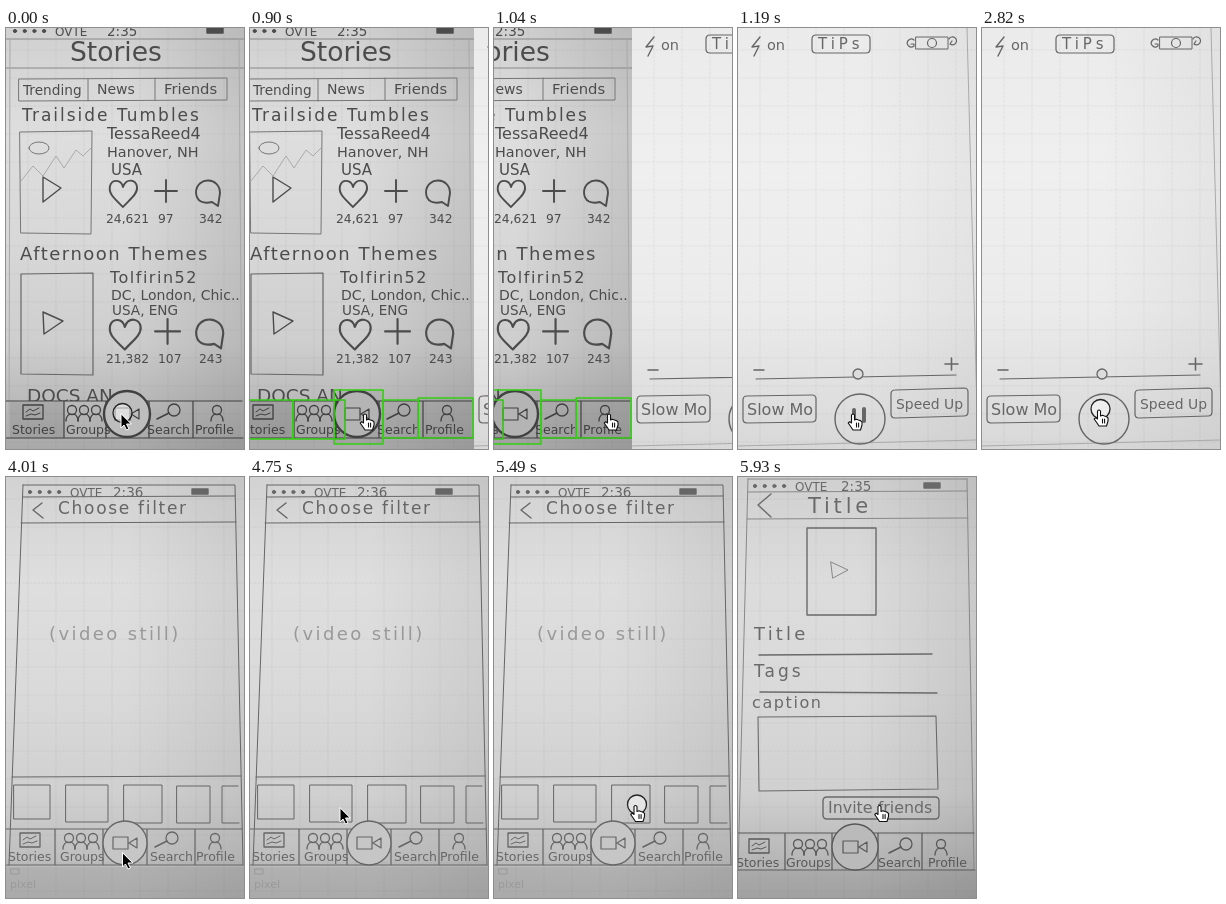
Write an HTML page with a canvas that moves like this. It is 238 by 421 pixels and loops after 8 s.

```html
<!DOCTYPE html>
<html lang="en">
<head>
<meta charset="utf-8">
<title>Paper prototype</title>
<style>
  html, body { margin: 0; width: 100%; height: 100%; overflow: hidden; background: #ccc; }
  canvas { display: block; width: 238px; height: 421px; }
</style>
</head>
<body>
<canvas id="stage"></canvas>
<script>
const W = 238, H = 421, LOOP = 8000;
const stage = document.getElementById('stage');
const dpr = window.devicePixelRatio || 1;
stage.width = W * dpr;
stage.height = H * dpr;
const ctx = stage.getContext('2d');
let ink = '#555'; // pencil tone of the current screen

// ---- drawing helpers ----
function draw(d, width = 1, color = ink, fill) {
  const path = new Path2D(d);
  if (fill) { ctx.fillStyle = fill; ctx.fill(path); }
  ctx.lineWidth = width;
  ctx.strokeStyle = color;
  ctx.stroke(path);
}

function drawAt(x, y, d, ...style) {
  ctx.save();
  ctx.translate(x, y);
  draw(d, ...style);
  ctx.restore();
}

function circle(x, y, r, width, color, fill) {
  drawAt(x, y, `M${r},0 A${r},${r} 0 1 1 ${-r},0 A${r},${r} 0 1 1 ${r},0Z`, width, color, fill);
}

function box(x1, y1, x2, y2, width, color, fill) {
  draw(`M${x1},${y1} H${x2} V${y2} H${x1}Z`, width, color, fill);
}

function roundBox(x, y, w, h, tilt = 0, width = 1.2) {
  draw(`M${x + 4},${y} L${x + w - 4},${y + tilt} q4,0 4,4 v${h - 8} q0,4 -4,4
        L${x + 4},${y + h} q-4,0 -4,-4 v${8 - h} q0,-4 4,-4Z`, width);
}

function text(str, x, y, size, spacing = 0, color = ink) {
  ctx.font = `${size}px "DejaVu Sans", sans-serif`;
  ctx.letterSpacing = spacing + 'px';
  ctx.fillStyle = color;
  ctx.fillText(str, x, y);
}

function gradient(x, y, tones) {
  const g = ctx.createLinearGradient(0, 0, x, y);
  tones.forEach((c, i) => g.addColorStop(i / (tones.length - 1), c));
  ctx.fillStyle = g;
  ctx.fillRect(0, 0, W, H);
}

// tones run top to bottom; shade darkens the right side
function paper(shade, ...tones) {
  gradient(0, H, tones);
  gradient(W, 0, ['rgba(40,40,40,0)', 'rgba(40,40,40,0)', `rgba(40,40,40,${shade})`]);
  let grid = '';
  for (let p = 22; p < H; p += 28) grid += `M0,${p} H${W} M${p},0 V${H}`;
  ctx.setLineDash([2, 2]);
  draw(grid, 1, 'rgba(90,90,90,.09)');
  ctx.setLineDash([]);
}

function statusBar(x, y, time, timeX, batteryX) {
  for (let i = 0; i < 4; i++) circle(x + i * 9.7, y, 1.6, 1, ink, ink);
  text('OVTE', x + 40, y + 5, 12);
  text(time, timeX, y + 5, 13.5);
  box(batteryX, y - 3, batteryX + 16, y + 2, 1.4, ink, ink);
}

const person = (x, y) => {
  circle(x, y, 4.5, 1.3);
  drawAt(x, y, 'M-2,4 Q-6,6 -6,11 M2,4 Q6,6 6,11', 1.3);
};

function camera(x, y) {
  draw(`M${x - 12},${y - 6} h15 v12 h-15Z M${x + 4},${y} l8,-5 v10Z`, 1.2);
}

// spots: icon centres; labels: left edges of the four captions
function tabBar({ top, bottom, dividers, spots, labels, iconY, base, cam, camFill, camLine = 1.3 }) {
  draw(`M0,${top} H236 M0,${bottom} H237` + dividers.map(x => `M${x},${top} V${bottom}`).join(''), 1.2);
  const [a, b, c, d] = spots;
  box(a - 10, iconY - 5, a + 10, iconY + 9, 1.3);
  drawAt(a, iconY, 'M-7,2 l4,-3 3,2 6,-3 M-7,6 l5,-2 4,1 5,-2', 1);
  for (const i of [-1, 0, 1]) person(b + i * 12, iconY);
  circle(c, iconY, 6, 1.3);
  draw(`M${c - 5},${iconY + 3} L${c - 17},${iconY + 9}`, 1.6);
  person(d, iconY);
  ['Stories', 'Groups', 'Search', 'Profile'].forEach((s, i) => text(s, labels[i], base, 12.5));
  circle(...cam, camLine, ink, camFill);
  camera(cam[0], cam[1]);
}

function counters(y, scale, likes, adds, notes) {
  const icon = (x, d) => {
    ctx.save();
    ctx.translate(x, y);
    ctx.scale(scale, scale);
    draw(d, 1.9);
    ctx.restore();
  };
  icon(103, 'M14,27 C6,19 -1,14 1,6 C3,-1 12,-1 14,7 C17,-2 27,-1 28,7 C29,14 20,20 14,27Z');
  icon(148, 'M1,11 H23 M12,0 V22');
  icon(189, 'M23,26 L25,13 C25,-3 2,-4 1,12 C1,22 9,24 17,22Z');
  const base = y + 39 + 4 * scale;
  text(likes, 100, base, 12.3);
  text(adds, 152, base, 12.3);
  text(notes, 193, base, 12.3);
}

// ---- screens ----
function stories() {
  ink = '#4c4c4c';
  paper(.13, '#d0d0d0', '#dedede', '#d8d8d8', '#cecece', '#a9a9a9');
  statusBar(9, 3, '2:35', 101, 201);
  draw('M0,11 H238 M0,40 H238', 1, '#888');
  draw('M4,11 L3,410 M233,11 L236,410', 1, '#aaa');
  text('Stories', 64, 33, 26.5);
  draw('M13,51 L221,50 V72 L13,73Z M82,51 V73 M149,50 V72', 1, '#777');
  text('Trending', 17, 67, 13.7);
  text('News', 91, 66, 14);
  text('Friends', 158, 66, 14.8);

  text('Trailside Tumbles', 16, 93, 17, 2);
  draw('M14,104 L86,103 L85,206 L15,205Z', 1, '#777');
  draw('M23,120 a10,6 0 1 1 20,0 a10,6 0 1 1 -20,0Z', 1, '#777');
  draw('M15,153 L27,138 37,148 50,128 58,140 70,122 77,128 85,120', 1, '#aaa');
  draw('M37,149 L55,160 37,174Z', 1.4);
  text('TessaReed4', 101, 111, 16);
  text('Hanover, NH', 101, 129, 14.4);
  text('USA', 105, 147, 15);
  counters(152, 1, '24,621', '97', '342');

  text('Afternoon Themes', 14, 232, 18, 1.5);
  draw('M15,246 L87,245 L87,347 L15,346Z', 1.2, '#666');
  draw('M37,284 L57,293 38,306Z', 1.4);
  text('Tolfirin52', 104, 255, 16, 1.5);
  text('DC, London, Chic..', 105, 272, 14);
  text('USA, ENG', 106, 287, 13.6);
  counters(291, 1.13, '21,382', '107', '243');

  ctx.save();
  ctx.beginPath();
  ctx.rect(0, 350, W, 23);
  ctx.clip();
  text('DOCS AN', 21, 374, 18.5);
  ctx.restore();
  ctx.fillStyle = 'rgba(70,70,70,.14)';
  ctx.fillRect(4, 374, 54, 36);
  ink = '#404040';
  tabBar({ top: 373, bottom: 410, dividers: [58, 100, 143, 187], spots: [27, 78, 168, 211],
           labels: [6, 60, 141, 189], iconY: 382, base: 406,
           cam: [121, 386, 23], camFill: '#bdbdbd', camLine: 2.4 });
}

function hotspots() {
  const spots = [[2, 372, 57, 411], [57, 372, 109, 411], [98, 362, 147, 416],
                 [147, 372, 182, 410], [182, 370, 237, 410]];
  for (const s of spots) box(...s, 1.6, '#35cf14', 'rgba(60,60,60,.07)');
}

function recorder(recording) {
  ink = '#666';
  paper(.05, '#ebebeb', '#efefef', '#ebebeb', '#d8d8d8');
  draw('M229,0 L239,385 M0,418 L238,412', 1, '#aaa');
  draw('M22,9 L14,19 21,18 16,28', 1.4);
  text('on', 29, 22, 14.5);
  roundBox(74, 7, 58, 18);
  text('TiPs', 80, 21, 15, 4);
  box(178, 9, 210, 21);
  circle(194, 15, 4.5, 1.2);
  draw('M176,12 a4,4 0 1 0 0,6 v-2 h-3 M211,11 a4,4 0 1 1 1,5 l2,-3', 1.2);
  draw('M16,342 H26 M207,336 H220 M213.5,330 V342', 1.6);
  draw('M18,351 L218,347', 1.2);
  circle(120, 346, 5, 1.3, ink, '#dcdcdc');
  roundBox(5, 368, 73, 27, -1);
  text('Slow Mo', 9, 387, 16);
  roundBox(153, 362, 77, 28, -2);
  text('Speed Up', 158, 381, 13.9);
  circle(122, 391, 25, 1.4);
  if (recording) draw('M116,382 V393 M126,381 V393', 4);
}

function filters() {
  ink = '#666';
  paper(.08, '#d2d2d2', '#dedede', '#dadada', '#d0d0d0', '#b4b4b4');
  ctx.fillStyle = 'rgba(80,80,80,.1)';
  ctx.fillRect(0, 390, W, 31);
  draw('M17,8 H229 L237,388 M17,8 L3,388 M17,20 L229,19 M15,46 L230,45 M6,300 L235,299');
  statusBar(24, 15, '2:36', 107, 186);
  draw('M36,26 L27,33 37,41', 1.4);
  text('Choose filter', 52, 37, 17, 1.7);
  text('(video still)', 43, 163, 18, 2.4, '#999');
  box(8, 308, 44, 342);
  box(60, 308, 102, 345);
  box(118, 308, 156, 346);
  box(171, 309, 204, 346);
  draw('M232,309 H216 V346 H233');
  tabBar({ top: 352, bottom: 388, dividers: [49, 97, 141, 189], spots: [24, 75, 166, 209],
           labels: [2, 54, 144, 190], iconY: 361, base: 384, cam: [119, 366, 22], camFill: '#c6c6c6' });
  text('pixel', 4, 411, 11, 0, '#999');
  box(5, 392, 13, 397, 1, '#999');
}

function details() {
  ink = '#6a6a6a';
  paper(.1, '#d0d0d0', '#dcdcdc', '#dadada', '#d0d0d0', '#a8a8a8');
  ctx.fillStyle = 'rgba(80,80,80,.08)';
  ctx.fillRect(0, 394, W, 27);
  draw('M10,2 H229 M10,15 L229,14 M9,42 L230,41 M10,2 L0,393 M229,2 L236,393', 1, '#888');
  statusBar(17, 9, '2:35', 103, 186);
  draw('M33,17 L20,28 33,40', 1.4);
  text('Title', 70, 36, 21, 3.8);
  box(69, 51, 138, 138, 1.4);
  draw('M93,85 L110,93 95,101Z', 1, '#888');
  text('Title', 16, 163, 18, 3.2);
  text('Tags', 16, 200, 17, 3);
  text('caption', 14, 231, 16, 1.6);
  draw('M21,178 L194,177 M22,215 L199,216', 1.4);
  draw('M20,240 L198,239 L200,312 L21,314Z', 1.1);
  roundBox(85, 320, 116, 22, 0, 1.4);
  text('Invite friends', 90, 336, 15.9);
  ink = '#585858';
  tabBar({ top: 356, bottom: 393, dividers: [47, 94, 140, 184], spots: [21, 72, 168, 203],
           labels: [-2, 48, 140, 190], iconY: 367, base: 390, cam: [117, 370, 23], camFill: '#bababa' });
}

// ---- timeline ----
// [time, distance scrolled]
const slide = [[0, 0], [900, 14], [1040, 100], [1190, W], [2960, W + 100], [3110, 2 * W],
               [5640, 2 * W + 14], [5780, 2 * W + 100], [5930, 3 * W]];

// [time, x, y, shape, pressed]
const pointer = [
  [0, 115, 386, 'arrow', true], [150, 115, 386, 'arrow'], [900, 115, 386, 'hand'],
  [1780, 115, 385, 'hand'], [1930, 115, 383, 'hand'], [2380, 117, 382, 'hand'],
  [2820, 117, 382, 'hand', true], [2960, 117, 382, 'hand'], [3110, 117, 382, 'arrow'],
  [4010, 116.5, 376, 'arrow'], [4160, 105, 366, 'arrow'], [4310, 85, 355, 'arrow'],
  [4460, 68, 343, 'arrow'], [4600, 73, 336, 'arrow'], [4750, 90, 331, 'arrow'],
  [4900, 112, 329, 'arrow'], [5050, 131, 328, 'arrow'], [5200, 141.5, 328.5, 'hand'],
  [5490, 141.5, 328.5, 'hand', true], [5640, 141.5, 328.5, 'hand']
];

const at = (steps, t) => steps.filter(s => s[0] <= t).pop();

function drawPointer([, x, y, shape, pressed]) {
  if (pressed) circle(x + 1.5, y - 1, 9.5, 1.3, '#222', 'rgba(255,255,255,.5)');
  if (shape === 'arrow')
    drawAt(x, y, 'M0,0 V14 L3,11 5.5,16 8,15 5.5,10 10,10Z', 1, '#fff', '#000');
  else
    drawAt(x, y, `M-1.5,9 V1 Q0,-1 1.5,1 V6 L3.5,5.2 5.5,6 7.5,6.6 9,8 V11 L7.5,16 H0
                  L-2,13 -4.8,9 -3.3,7.6Z M3.5,9 V13 M5.6,9 V13`, 1.1, '#111', '#fff');
}

function frame(now) {
  const t = now % LOOP;
  const screens = [stories, () => recorder(t < 2380), filters, details];
  const scroll = at(slide, t)[1];
  ctx.setTransform(dpr, 0, 0, dpr, 0, 0);
  ctx.lineJoin = ctx.lineCap = 'round';
  screens.forEach((screen, i) => {
    const x = i * W - scroll;
    if (Math.abs(x) >= W) return;
    ctx.save();
    ctx.translate(x, 0);
    ctx.beginPath();
    ctx.rect(0, 0, W, H);
    ctx.clip();
    screen();
    if (i === 0 && t >= 900) hotspots();
    ctx.restore();
  });
  drawPointer(at(pointer, t));
  requestAnimationFrame(frame);
}
requestAnimationFrame(frame);
</script>
</body>
</html>
```
